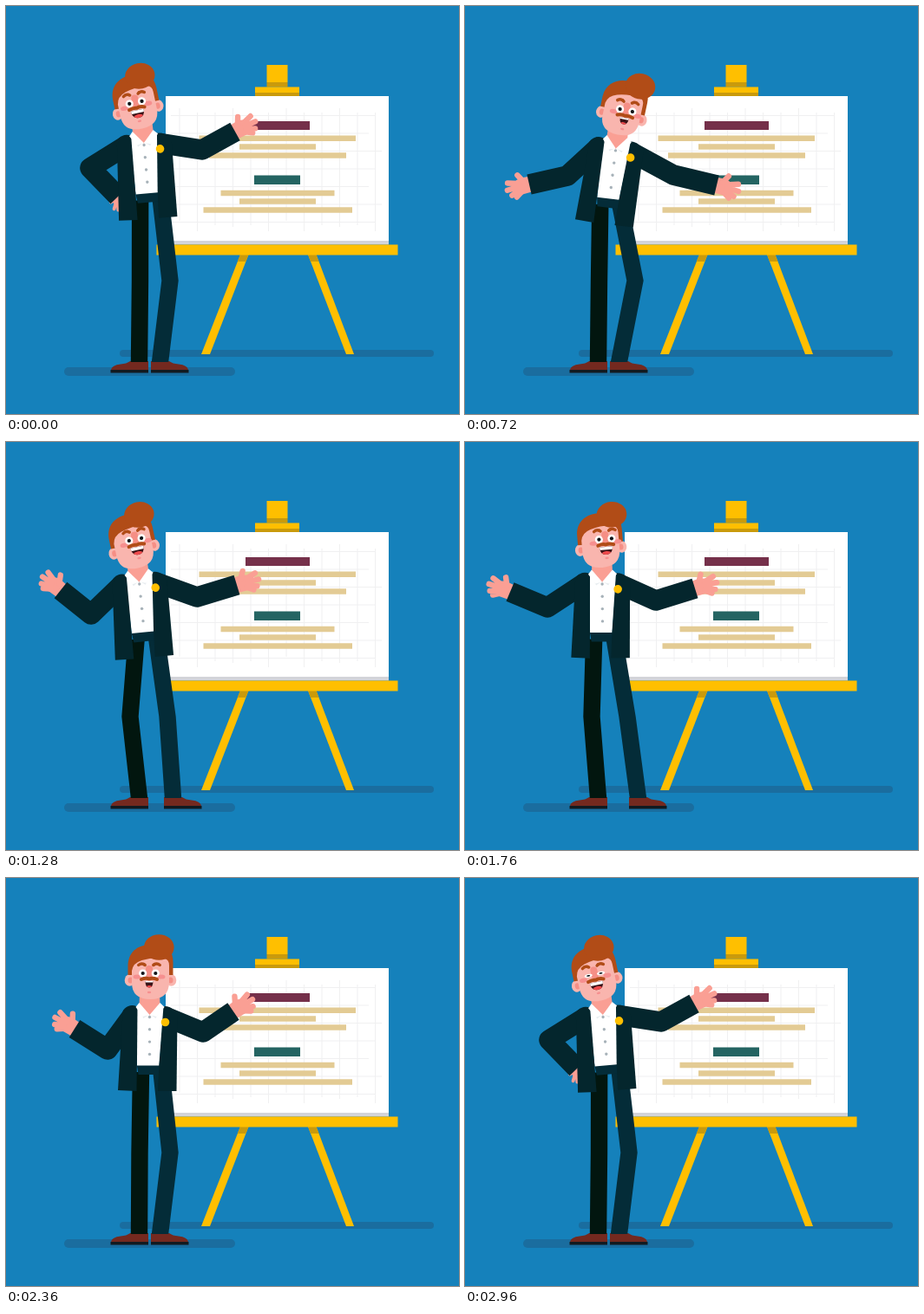
These frames come from a looping animation (522x471 px, 3000 ms). An HTML page with a canvas:

```html
<!DOCTYPE html>
<html lang="en">
<head>
<meta charset="utf-8">
<title>Presenter</title>
<style>
  html, body { margin: 0; width: 100%; height: 100%; overflow: hidden; background: #1581bb; }
  canvas { display: block; width: 522px; height: 471px; }
</style>
</head>
<body>
<canvas id="stage"></canvas>
<script>
const W = 522, H = 471, LOOP = 3000, STEP = 40;
const canvas = document.getElementById('stage');
const ctx = canvas.getContext('2d');
const dpr = window.devicePixelRatio || 1;
canvas.width = W * dpr;
canvas.height = H * dpr;

const C = {
  bg: '#1581bb', shade: '#1a6d9f', gold: '#ffbf00', goldDark: '#c99a0c',
  tan: '#e3cb94', maroon: '#75304a', teal: '#246462', grid: '#f0f0f1', tray: '#d3d4d9',
  face: '#f9b5ae', skin: '#fa9f94', nose: '#f58f86', cheek: '#f68f8f', hair: '#b14c17',
  jacket: '#04262d', front: '#042c38', back: '#02160f', shoe: '#74291f', sole: '#121a20',
  shirt: '#ffffff', fold: '#e8edf0', button: '#a7b2b9', mouth: '#3a1216', tongue: '#ee4a4c'
};
const RAD = Math.PI / 180;

// body: neck x, y, lean | head: x, y, tilt, turn, lift, mouth half-width
// legs: back knee, front knee, foot shift, hand-on-hip | arms: elbow, wrist
const rest = {
  body: [158, 148, -5], head: [152, 119, -12, -1, -1, 7.5], legs: [154.5, 189, 0, 1],
  left: [97, 187, 129, 220], right: [226, 166, 264, 145]
};
const point = {
  body: [171.5, 154, 4.5], head: [172.5, 125.5, 4, 8, 1.5, 4.5], legs: [154.5, 197, 0, 1],
  left: [104, 187, 131, 224], right: [236, 191, 285, 193]
};
const open = {
  body: [175, 154.5, 7], head: [180.5, 126, 12, 4, .5, 5], legs: [154.5, 196, 0, 0],
  left: [118, 196, 74, 206], right: [240, 195, 290, 207]
};
const reach = {
  ...open, body: [172, 154, 5], head: [176, 125, 8, 4, 0, 6],
  left: [102, 183, 53, 184], right: [236, 193, 287, 203]
};
const step = {
  body: [152.5, 151.5, -5.7], head: [147.5, 123, -12, 3.6, -3, 7.5], legs: [143, 186, 15, 0],
  left: [98, 199, 63, 171], right: [220, 179, 266, 165]
};
const wide = {
  body: [158, 151.5, -.5], head: [156.5, 122, -5, 6, -2.5, 7.5], legs: [146, 187, 22, 0],
  left: [95, 191, 52, 173], right: [220, 183, 265, 169]
};
const front = {
  body: [165.5, 148, 0], head: [166.5, 117, 0, -1.5, 0, 4.5], legs: [154, 189, 0, 0],
  left: [117, 198, 79, 174], right: [227, 178, 262, 154]
};
const lean = {
  ...front, body: [166, 150, 1], head: [167, 119, 2, 3, 0, 5], legs: [150, 190, 11, 0],
  left: [110, 195, 69, 178], right: [233, 181, 283, 182]
};

const SHOULDER = { left: [-20, 11], right: [18, 12] };

function local(body, [x, y]) {
  const a = body[2] * RAD, c = Math.cos(a), s = Math.sin(a);
  return [body[0] + x * c - y * s, body[1] + x * s + y * c];
}

// Joint points become angle and length so that arms swing on arcs.
function polar(p, side) {
  const [ex, ey, wx, wy] = p[side];
  const [sx, sy] = local(p.body, SHOULDER[side]);
  const bone = (x, y) => {
    let a = Math.atan2(y, x);
    if (side === 'left' && a < 0) a += 2 * Math.PI;
    return [a, Math.hypot(x, y)];
  };
  return [...bone(ex - sx, ey - sy), ...bone(wx - ex, wy - ey)];
}

const rig = p => ({ ...p, left: polar(p, 'left'), right: polar(p, 'right') });
const keys = [
  [0, rest], [40, rest], [320, point], [500, point], [720, open], [900, reach], [1080, reach],
  [1280, step], [1440, step], [1760, wide], [2060, lean], [2360, front], [2500, front],
  [2880, rest], [LOOP, rest]
].map(([t, p]) => [t, rig(p)]);

function poseAt(t) {
  const i = keys.findIndex(k => k[0] > t);
  const [t0, a] = keys[i - 1], [t1, b] = keys[i];
  const u = (t - t0) / (t1 - t0), e = u * u * (3 - 2 * u);
  const out = {};
  for (const part in a) out[part] = a[part].map((v, j) => v + (b[part][j] - v) * e);
  return out;
}

// Share of the eye that is open.
function eyeAt(t) {
  if (t < 2840) return 1;
  return t < 2900 ? Math.max(.1, 1 - (t - 2820) / 70) : .1 + (t - 2900) / 200;
}

function rect(color, x, y, w, h, r = 0) {
  ctx.fillStyle = color;
  ctx.beginPath();
  ctx.roundRect(x, y, w, h, r);
  ctx.fill();
}
function poly(color, ...pts) {
  ctx.fillStyle = color;
  ctx.beginPath();
  pts.forEach(p => ctx.lineTo(p[0], p[1]));
  ctx.closePath();
  ctx.fill();
}
function oval(color, x, y, rx, ry = rx) {
  ctx.fillStyle = color;
  ctx.beginPath();
  ctx.ellipse(x, y, rx, ry, 0, 0, 7);
  ctx.fill();
}
function shape(color, d) {
  ctx.fillStyle = color;
  ctx.fill(new Path2D(d));
}
function stroke(color, width, d) {
  ctx.strokeStyle = color;
  ctx.lineWidth = width;
  ctx.lineCap = ctx.lineJoin = 'round';
  ctx.stroke(new Path2D(d));
}
function at(x, y, angle, draw) {
  ctx.save();
  ctx.translate(x, y);
  ctx.rotate(angle);
  draw();
  ctx.restore();
}

function drawBoard() {
  rect(C.bg, 0, 0, W, H);
  rect(C.shade, 131, 397, 362, 8, 4);
  rect(C.shade, 67, 417, 197, 10, 5);
  poly(C.gold, [270, 287], [279.5, 287], [235, 402], [225, 402]);
  poly(C.gold, [348, 287], [357.5, 287], [401, 402], [392, 402]);
  poly(C.goldDark, [270, 287], [279.5, 287], [276.4, 295], [266.8, 295]);
  poly(C.goldDark, [348, 287], [357.5, 287], [360.5, 295], [351, 295]);
  rect(C.gold, 300.5, 68, 24, 20);
  rect(C.goldDark, 300.5, 88, 24, 5.5);
  rect(C.gold, 287, 93.5, 51, 6.5);
  rect(C.goldDark, 287, 100, 51, 4);
  rect(C.shirt, 184, 104, 257, 167);
  for (let i = 0; i < 12; i++) rect(C.grid, 199.5 + i * 20.5, i % 3 ? 123 : 118, 1, i % 2 ? 137 : 130);
  for (let i = 0; i < 7; i++) rect(C.grid, 190, 126 + i * 20.5, [236, 228, 243][i % 3], 1);
  rect(C.maroon, 276, 133, 74, 10);
  rect(C.teal, 286, 195.5, 53, 10.5);
  [[222.5, 149.5, 180.5], [269, 159.3, 88], [234, 169.3, 158],
   [247.5, 212.7, 131], [269, 222.3, 88], [227.5, 232.3, 171.5]]
    .forEach(([x, y, w]) => rect(C.tan, x, y, w, 6.5));
  rect(C.tray, 184, 271, 257, 4.5);
  rect(C.gold, 173.5, 275.5, 278, 12);
}

function drawShoe(x, dir) {
  ctx.save();
  ctx.translate(x, 410);
  ctx.scale(dir, 1);
  shape(C.shoe, 'M0 0H21Q25 3 32 3.5Q42 4.500 43 10H0Z');
  rect(C.sole, 0, 10, 43.5, 3.5);
  ctx.restore();
}

function drawLeg(color, hip, knee, foot) {
  const w = 9.7, mid = 317;
  poly(color, [hip[0] - w, hip[1]], [knee - w, mid], [foot - w, 411],
    [foot + w, 411], [knee + w, mid], [hip[0] + w, hip[1]]);
}

function drawHand(x, y, angle, scale, flip) {
  at(x, y, angle, () => {
    ctx.scale(scale, flip ? -scale : scale);
    shape(C.skin, 'M-2 -9L8 -9.500Q18 -8 19 0Q18 9 10 9.500L-2 9Z');
    stroke(C.skin, 6.4, 'M6 -5L11 -13.500M13 -4L24 -7M13 0L26 1M12 4L22 8M10 6L17 11');
  });
}

function drawArm(p, side) {
  const [a, la, b, lb] = p[side];
  const [sx, sy] = local(p.body, SHOULDER[side]);
  const ex = sx + la * Math.cos(a), ey = sy + la * Math.sin(a);
  const wx = ex + lb * Math.cos(b), wy = ey + lb * Math.sin(b);
  const hip = side === 'left' ? p.legs[3] : 0;
  drawHand(wx, wy, b + hip * 45 * RAD, 1 - .4 * hip, side === 'left');
  oval(C.jacket, sx, sy, 12);
  ctx.strokeStyle = C.jacket;
  ctx.lineWidth = 23.5;
  ctx.lineCap = 'butt';
  ctx.lineJoin = 'round';
  ctx.beginPath();
  ctx.moveTo(sx, sy);
  ctx.lineTo(ex, ey);
  ctx.lineTo(wx, wy);
  ctx.stroke();
}

function drawTorso([x, y, lean]) {
  at(x, y, lean * RAD, () => {
    poly(C.front, [-15, 66], [13, 66], [13, 79], [-13, 79]);
    poly(C.shirt, [-16, 0], [17, 0], [11, 68.5], [-14.5, 68.5]);
    poly(C.jacket, [-14, 0], [-24, 0], [-31, 9], [-36.5, 97], [-15, 98], [-14.5, 60]);
    poly(C.jacket, [16, 0], [24, 3], [32, 11], [31, 98], [9.5, 98], [11, 66]);
    poly(C.fold, [-14, 0], [-7, 14], [0, 9], [7, 14], [15, 0]);
    poly(C.skin, [-11.5, -16], [11.5, -16], [12, 0], [0, 10.5], [-12, 0]);
    poly(C.shirt, [-12, -4], [-16, 1], [-8, 12], [0, 10]);
    poly(C.shirt, [12, -4], [17, 1], [8, 12], [0, 10]);
    for (let i = 0; i < 4; i++) oval(C.button, 0, 12.5 + i * 14.3, 1.7);
    oval(C.gold, 18, 18.5, 4.8);
  });
}

function drawFace(lift, mouth, eye) {
  const y = lift - 7;
  oval(C.cheek, -14, y + 4, 4.5, 2.6);
  oval(C.cheek, 14, y + 4, 4.5, 2.6);
  rect(C.nose, -4, y - 9, 8, 14, 4);
  for (const s of [-1, 1]) {
    ctx.save();
    ctx.translate(s * 7.3, y);
    stroke(C.hair, 3.4, `M${-s} -10.500Q${s * 2} -12 ${s * 5} -9.500`);
    stroke(C.hair, 3.4, `M${-s * 2.5} -9.500L${-s} -10.500`);
    ctx.scale(1, eye);
    oval(C.shirt, 0, 0, 4.6);
    oval('#101418', 0, 0, 2.1);
    ctx.restore();
  }
  ctx.save();
  ctx.translate(0, y + 10);
  const drop = mouth > 6 ? 10 : 8.5;
  const lips = new Path2D(`M${-mouth} -1H${mouth}Q${mouth} ${drop - 2} 0 ${drop - 2}Q${-mouth} ${drop - 2} ${-mouth} -1Z`);
  ctx.clip(lips);
  rect(C.mouth, -9, -2, 18, 14);
  oval(C.tongue, 0, 7, mouth * .75, 3);
  rect(C.shirt, -9, -2, 18, mouth > 6 ? 4.4 : 2.6);
  ctx.restore();
  stroke(C.hair, 4, `M-9 ${y + 7}Q-4 ${y + 5} 0 ${y + 6.5}Q4 ${y + 5} 9 ${y + 7}`);
  oval(C.cheek, 0, y + 22, 2.2, 1.2);
}

function drawHead([x, y, tilt, turn, lift, mouth], eye) {
  at(x, y, tilt * RAD, () => {
    oval(C.face, -24, 1, 5.8, 6.8);
    oval(C.face, 24, 1, 5.8, 6.8);
    oval(C.nose, -23, 1, 3, 3.6);
    oval(C.nose, 23, 1, 3, 3.6);
    shape(C.hair, 'M-26 -5V-17C-25 -34 -12 -40 0 -40H10C20 -39 26 -32 26 -20V-5Z');
    shape(C.face, 'M-21.500 -10Q-20 -19 -10 -22Q4 -26 16 -24Q21.500 -23 21.500 -16V4Q21 23 0 23Q-21.500 23 -21.500 4Z');
    at(turn, 0, 0, () => drawFace(lift, mouth, eye));
    oval(C.hair, 11 + turn * .8, -37, 17.3, 14.8);
  });
}

function drawMan(t) {
  const p = poseAt(t);
  const [backKnee, frontKnee, shift] = p.legs;
  drawShoe(164, -1);
  drawShoe(167 + shift, 1);
  drawLeg(C.back, local(p.body, [-10, 76]), backKnee, 153.5);
  drawLeg(C.front, local(p.body, [13.5, 76]), frontKnee, 177.5 + shift);
  drawArm(p, 'left');
  drawArm(p, 'right');
  drawTorso(p.body);
  drawHead(p.head, eyeAt(t));
}

const start = performance.now();
function frame() {
  const t = Math.floor(((performance.now() - start) % LOOP) / STEP) * STEP;
  ctx.setTransform(dpr, 0, 0, dpr, 0, 0);
  drawBoard();
  drawMan(t);
  requestAnimationFrame(frame);
}
frame();
</script>
</body>
</html>
```
